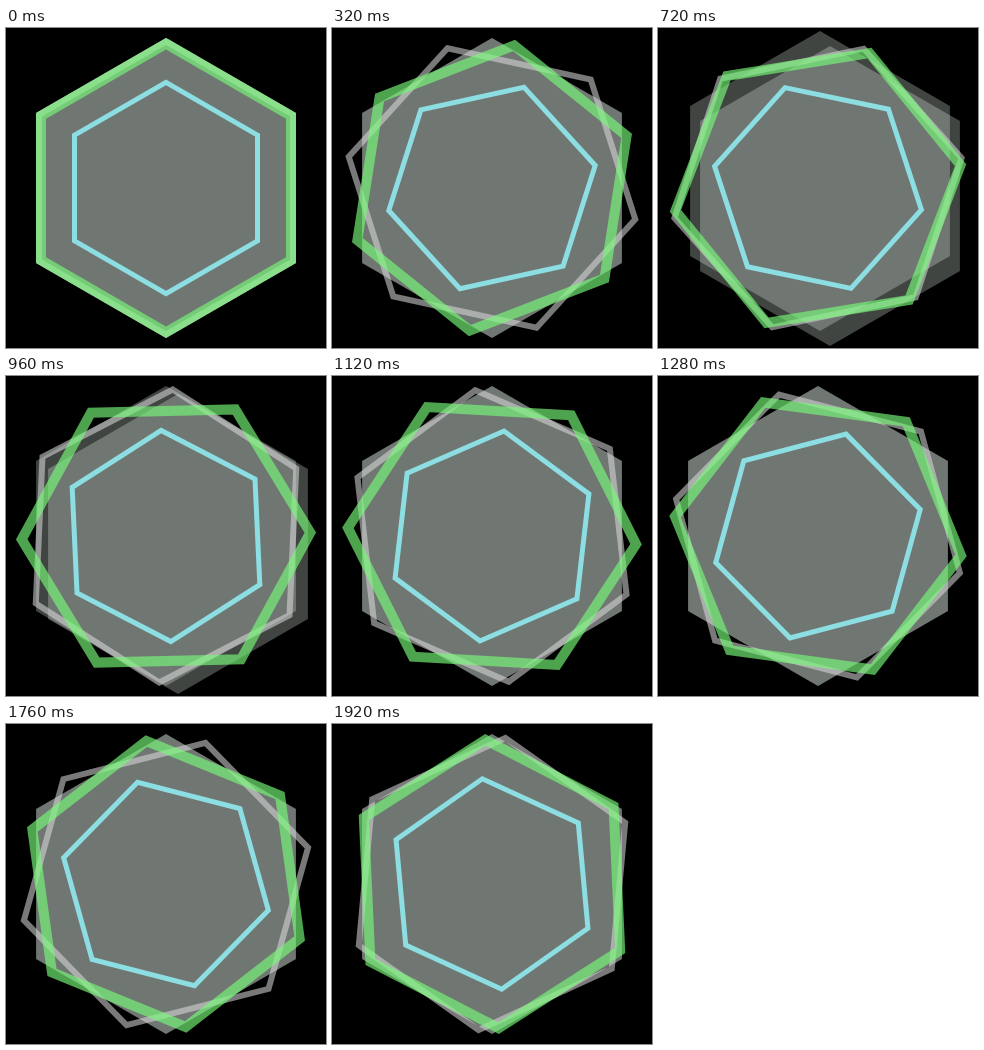
These frames come from a looping animation (320x320 px, 2 s). An HTML page with a canvas:

```html
<!DOCTYPE html>
<html lang="en">
<head>
<meta charset="utf-8">
<title>Turning hexagons</title>
<style>
  html, body { margin: 0; width: 100%; height: 100%; overflow: hidden; background: #000; }
  canvas { display: block; width: 320px; height: 320px; }
</style>
</head>
<body>
<canvas id="stage" width="320" height="320"></canvas>
<script>
const ctx = document.getElementById('stage').getContext('2d');
const LOOP = 2000, STEP = 80, RAD = Math.PI / 180;

function hexPath(x, y, radius, degrees) {
  ctx.beginPath();
  for (let i = 0; i < 6; i++) {
    const a = (degrees + i * 60) * RAD;
    ctx.lineTo(x + radius * Math.sin(a), y - radius * Math.cos(a));
  }
  ctx.closePath();
}

function plate(dx, dy) {
  hexPath(160 + dx, 160 + dy, 150, 0);
  ctx.fillStyle = 'rgba(240, 255, 243, 0.27)';
  ctx.fill();
}

// The apothem is measured to the outer edge of the line.
function ring(apothem, width, degrees, color) {
  hexPath(160, 160, (apothem - width / 2) / Math.cos(30 * RAD), degrees);
  ctx.lineWidth = width;
  ctx.strokeStyle = color;
  ctx.stroke();
}

function draw(t) {
  ctx.fillStyle = '#000';
  ctx.fillRect(0, 0, 320, 320);

  // The two plates jump apart, then return one after the other.
  if (t >= 500 && t < 840) plate(2, -7); else plate(0, 0);
  if (t >= 500 && t < 1080) plate(12, 8); else plate(0, 0);

  const eased = t - 30 * Math.abs(Math.sin(Math.PI * t / 1000));
  const turn = eased * 0.06;
  ring(130, 6, -turn, 'rgba(221, 221, 221, 0.55)');
  ring(130, 10, turn / 2, 'rgba(120, 250, 120, 0.65)');
  ring(94, 5, turn, '#8cdee2');
}

const start = performance.now();
function tick() {
  const t = (performance.now() - start) % LOOP;
  draw(Math.floor(t / STEP) * STEP);
  requestAnimationFrame(tick);
}
tick();
</script>
</body>
</html>
```
